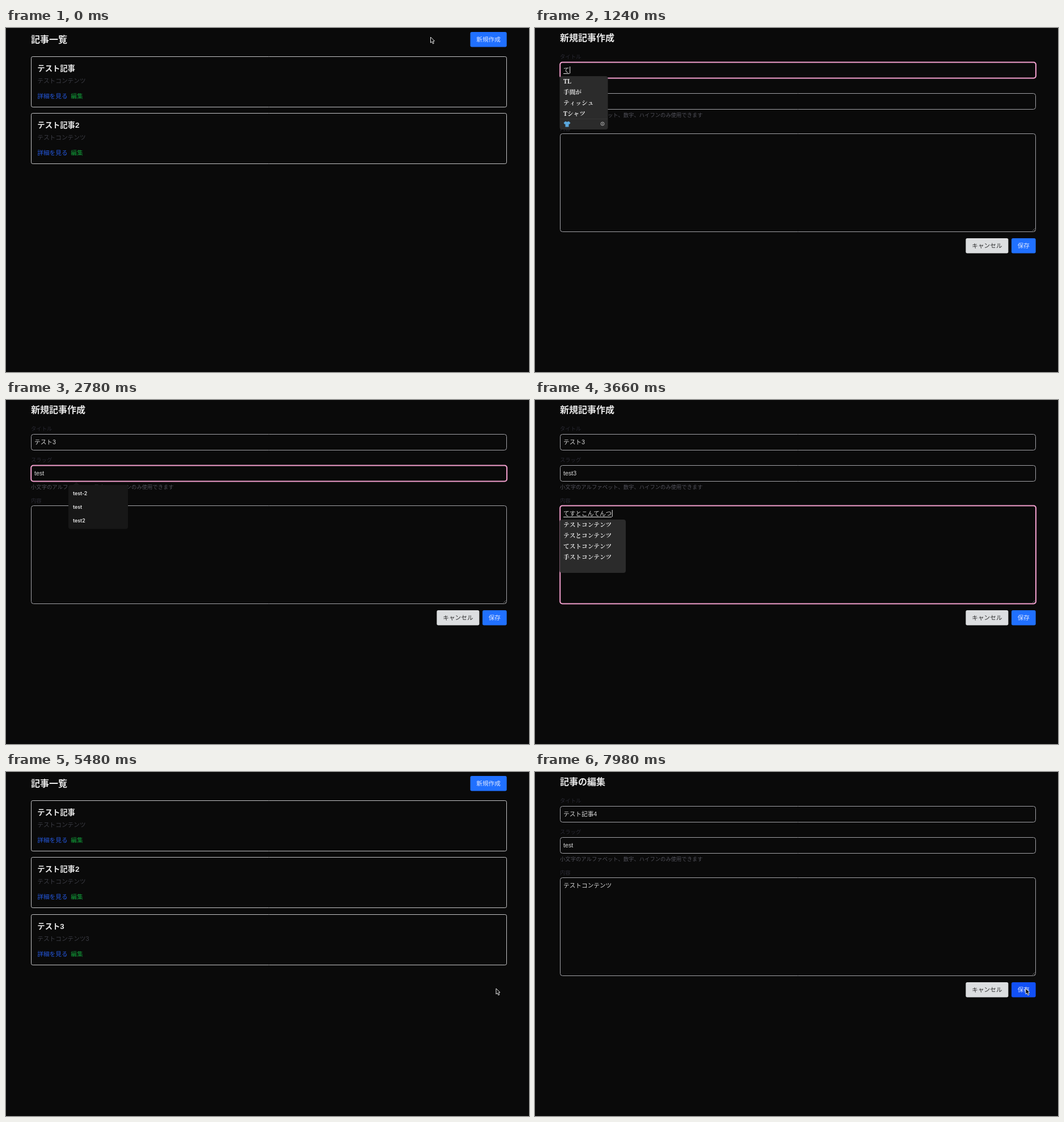
Recreate the animation shown at these times as an HTML page with a canvas. Size 922 px wide and 607 px high, loop 8 s.

```html
<!DOCTYPE html>
<html lang="ja">
<head>
<meta charset="utf-8">
<title>記事一覧</title>
<style>
  html, body { margin: 0; width: 100%; height: 100%; overflow: hidden; background: #0a0a0a; }
  canvas { display: block; }
</style>
</head>
<body>
<canvas id="stage" width="922" height="607"></canvas>
<script>
const ctx = document.getElementById('stage').getContext('2d');
const LOOP = 8000;
const SANS = "'Liberation Sans', 'Noto Sans CJK JP', 'Noto Sans CJK', sans-serif";
const SERIF = "'Noto Serif', 'Noto Serif CJK JP', 'Noto Sans CJK JP', 'Noto Sans CJK', serif";
const BODY = 10.67, SMALL = 9.33, HEADING = 16;
const CARD_LINE = '#c4c4c6', FIELD_LINE = '#a2a2a7', WHITE = '#e8e8e8', INPUT = '#dadada';

// Each track lists [start time, value]; a value holds until the next one.
const pages = [[0, 'list'], [600, 'new'], [5160, 'list'], [6260, 'edit']];
const focuses = [[0, ''], [1000, 'title'], [2300, 'slug'], [3120, 'body'], [4760, ''], [7060, 'title'], [7860, '']];
const titles = [[0, ''], [1200, 'て'], [1360, 'てす'], [1500, 'てすと'], [1740, 'テスト'], [1920, 'テスト3'], [6260, 'テスト記事'], [7300, 'テスト記事4']];
const slugs = [[0, ''], [2500, 't'], [2580, 'te'], [2660, 'tes'], [2740, 'test'], [2960, 'test3'], [6260, 'test']];
const typed = 'てすとこんてんつ';
const bodies = [[0, ''], ...[...typed].map((_, i) => [3240 + i * 55, typed.slice(0, i + 1)]),
  [3800, 'テストコンテンツ'], [3960, 'テストコンテンツ3'], [6260, 'テストコンテンツ']];
const composing = [[0, false], [1200, true], [2060, false], [3240, true], [4080, false]];
const candidates = [[0, null],
  [1200, ['TL', '手間が', 'ティッシュ', 'Tシャツ']],
  [1360, ['テスト', 'です', 'ですが', 'テスト中']],
  [1740, null],
  [3240, ['テスト', 'てすと', 'テスト中', 'テスト用']],
  [3460, ['テストコンテンツ', 'テスとコンテンツ', 'てストコンテンツ', '手ストコンテンツ']],
  [3800, null]];

// [time, x, y] of the pointer, eased between points.
const pointer = [[0, 748.5, 16], [60, 748.5, 16], [440, 848, 17], [640, 848, 17], [960, 300, 74], [4200, 300, 74],
  [4720, 864, 382], [5620, 864, 382], [6080, 122, 116], [6400, 122, 116], [6880, 293, 189], [7040, 310, 76],
  [7400, 310, 76], [7820, 865, 382], [8000, 865, 382]];
const pointerShown = [[0, true], [1160, false], [4200, true], [7280, false], [7400, true]];

const fields = {
  title: { y: 60.5, h: 28, textY: 74, values: titles },
  slug: { y: 115.5, h: 28, textY: 129, values: slugs },
  body: { y: 186.5, h: 173, textY: 200, values: bodies }
};

const at = (track, t) => track.findLast(([start]) => t >= start)[1];

function pointerAt(t) {
  const i = Math.max(1, pointer.findIndex(([time]) => time > t));
  const [t0, x0, y0] = pointer[i - 1], [t1, x1, y1] = pointer[i];
  const p = (t - t0) / (t1 - t0), k = p * p * (3 - 2 * p);
  return [x0 + (x1 - x0) * k, y0 + (y1 - y0) * k];
}

// y is the vertical middle of the characters.
function text(str, x, y, { size = BODY, color = WHITE, weight = 400, family = SANS, align = 'left' } = {}) {
  ctx.font = `${weight} ${size}px ${family}`;
  ctx.textAlign = align;
  ctx.fillStyle = color;
  ctx.fillText(str, x, y + size * 0.38);
  return ctx.measureText(str).width;
}

function box(x, y, w, h, r, { fill, stroke, width = 1 }) {
  ctx.beginPath();
  ctx.roundRect(x, y, w, h, r);
  if (fill) { ctx.fillStyle = fill; ctx.fill(); }
  if (stroke) { ctx.strokeStyle = stroke; ctx.lineWidth = width; ctx.stroke(); }
}

function polygon(points, fill, stroke) {
  ctx.beginPath();
  points.forEach(([x, y]) => ctx.lineTo(x, y));
  ctx.closePath();
  ctx.fillStyle = fill;
  ctx.fill();
  if (stroke) { ctx.strokeStyle = stroke; ctx.lineWidth = 1; ctx.stroke(); }
}

function line(x1, y1, x2, y2, color) {
  ctx.beginPath();
  ctx.moveTo(x1, y1);
  ctx.lineTo(x2, y2);
  ctx.strokeStyle = color;
  ctx.lineWidth = 1;
  ctx.stroke();
}

function button(label, x, y, w, [mx, my], primary = true) {
  const hover = mx >= x && mx <= x + w && my >= y && my <= y + 26.5;
  const fill = primary ? (hover ? '#1250f5' : '#2070ff') : '#dcdee0';
  box(x, y, w, 26.5, 2.7, { fill });
  text(label, x + w / 2, y + 12.8, { color: primary ? '#dce6ff' : '#2a2a2a', align: 'center' });
}

function drawList(t, mouse) {
  text('記事一覧', 44, 20, { size: HEADING, weight: 700 });
  button('新規作成', 818.5, 7, 64.2, mouse);
  const articles = [['テスト記事', 'テストコンテンツ'], ['テスト記事2', 'テストコンテンツ']];
  if (t >= 5160) articles.push(['テスト3', 'テストコンテンツ3']);
  articles.forEach(([title, content], i) => {
    const y = 50 + i * 100.7;
    box(44.5, Math.floor(y) + 0.5, 838, 89, 2.7, { stroke: CARD_LINE });
    text(title, 55.3, y + 20.5, { size: 13.33, weight: 700 });
    text(content, 55.3, y + 42.5, { color: '#3c3d45' });
    text('詳細を見る', 55.3, y + 69.5, { color: '#2457dc' });
    text('編集', 114.3, y + 69.5, { color: '#119c38' });
  });
}

function drawField({ y, h, textY, values }, t, focused) {
  const value = at(values, t);
  box(44.5, y, 838, h, 4, { stroke: FIELD_LINE });
  if (focused) box(44.2, y, 838.8, h, 4, { stroke: '#f39fce', width: 2 });
  const end = 50 + text(value, 50, textY, { color: INPUT });
  if (!focused || !at(composing, t)) return;
  line(end + 1, textY - 6, end + 1, textY + 6, WHITE);
  line(50, textY + 6.5, end, textY + 6.5, WHITE);
}

function drawCandidates(items, y, withIcon) {
  const w = items[0].length > 6 ? 116.5 : 85;
  box(43.5, y, w, 94, 4, { fill: '#2b2b2b' });
  items.forEach((item, i) => text(item, 50, y + 9.2 + i * 18.8, { family: SERIF, weight: 600 }));
  if (!withIcon) return;
  line(44, y + 75.5, 43 + w, y + 75.5, '#363636');
  const shirt = [[-3, -5], [-1, -4], [1, -4], [3, -5], [6, -2], [4, 0.5], [3, 0], [3, 5], [-3, 5], [-3, 0], [-4, 0.5], [-6, -2]];
  polygon(shirt.map(([dx, dy]) => [56.5 + dx, y + 84.5 + dy]), '#5aa7dc');
  ctx.beginPath();
  ctx.arc(119, y + 84, 3, 0, Math.PI * 2);
  ctx.strokeStyle = '#ccc';
  ctx.lineWidth = 0.8;
  ctx.stroke();
  line(119, y + 82.5, 119, y + 85.5, '#ccc');
}

function drawSuggestions() {
  polygon([[118, 150.5], [124, 145], [130, 150.5]], '#171717');
  box(110, 150, 105, 77.5, 4, { fill: '#171717' });
  ['test-2', 'test', 'test2'].forEach((word, i) =>
    text(word, 118, 164.8 + i * 24, { size: 8.8, weight: 600, family: 'Inter, sans-serif' }));
}

function drawForm(t, page, mouse) {
  const focus = at(focuses, t), label = { size: SMALL, color: '#2a2a34' };
  text(page === 'new' ? '新規記事作成' : '記事の編集', 44, 17, { size: HEADING, weight: 700 });
  text('タイトル', 44, 50.5, label);
  text('スラッグ', 44, 105.5, label);
  text('小文字のアルファベット、数字、ハイフンのみ使用できます', 44, 153, { size: SMALL, color: '#505059' });
  text('内容', 44, 177, label);
  for (const name in fields) drawField(fields[name], t, name === focus);
  line(877, 358, 881.5, 353.5, '#666');
  line(880, 358, 881.5, 356.5, '#666');
  button('キャンセル', 759.4, 371, 75, mouse, false);
  button('保存', 840, 371, 42.7, mouse);
  const items = at(candidates, t);
  if (items) drawCandidates(items, focus === 'title' ? 85 : 211, items[0] === 'TL');
  if (t >= 2500 && t < 2960) drawSuggestions();
}

function drawPointer([x, y], page) {
  const overField = page !== 'list' && x > 44 && x < 883 &&
    Object.values(fields).some(f => y >= f.y && y <= f.y + f.h);
  if (overField) {
    line(x, y - 5, x, y + 5, '#ddd');
    for (const side of [-1, 1]) {
      line(x - 3, y + side * 6, x, y + side * 5, '#ddd');
      line(x + 3, y + side * 6, x, y + side * 5, '#ddd');
    }
    line(x - 1.5, y + 1.5, x + 1.5, y + 1.5, '#ddd');
  } else {
    const arrow = [[0, 0], [0, 10], [2.3, 8], [4, 11.8], [5.8, 11], [4.2, 7.3], [7, 7]];
    polygon(arrow.map(([dx, dy]) => [x + dx, y + dy]), '#0a0a0a', '#e8e8e8');
  }
}

function frame(now) {
  const t = now % LOOP, page = at(pages, t), mouse = pointerAt(t);
  ctx.fillStyle = '#0a0a0a';
  ctx.fillRect(0, 0, 922, 607);
  if (page === 'list') drawList(t, mouse);
  else drawForm(t, page, mouse);
  if (at(pointerShown, t)) drawPointer(mouse, page);
}

const start = performance.now();
function tick() {
  frame(performance.now() - start);
  requestAnimationFrame(tick);
}
tick();
</script>
</body>
</html>
```
